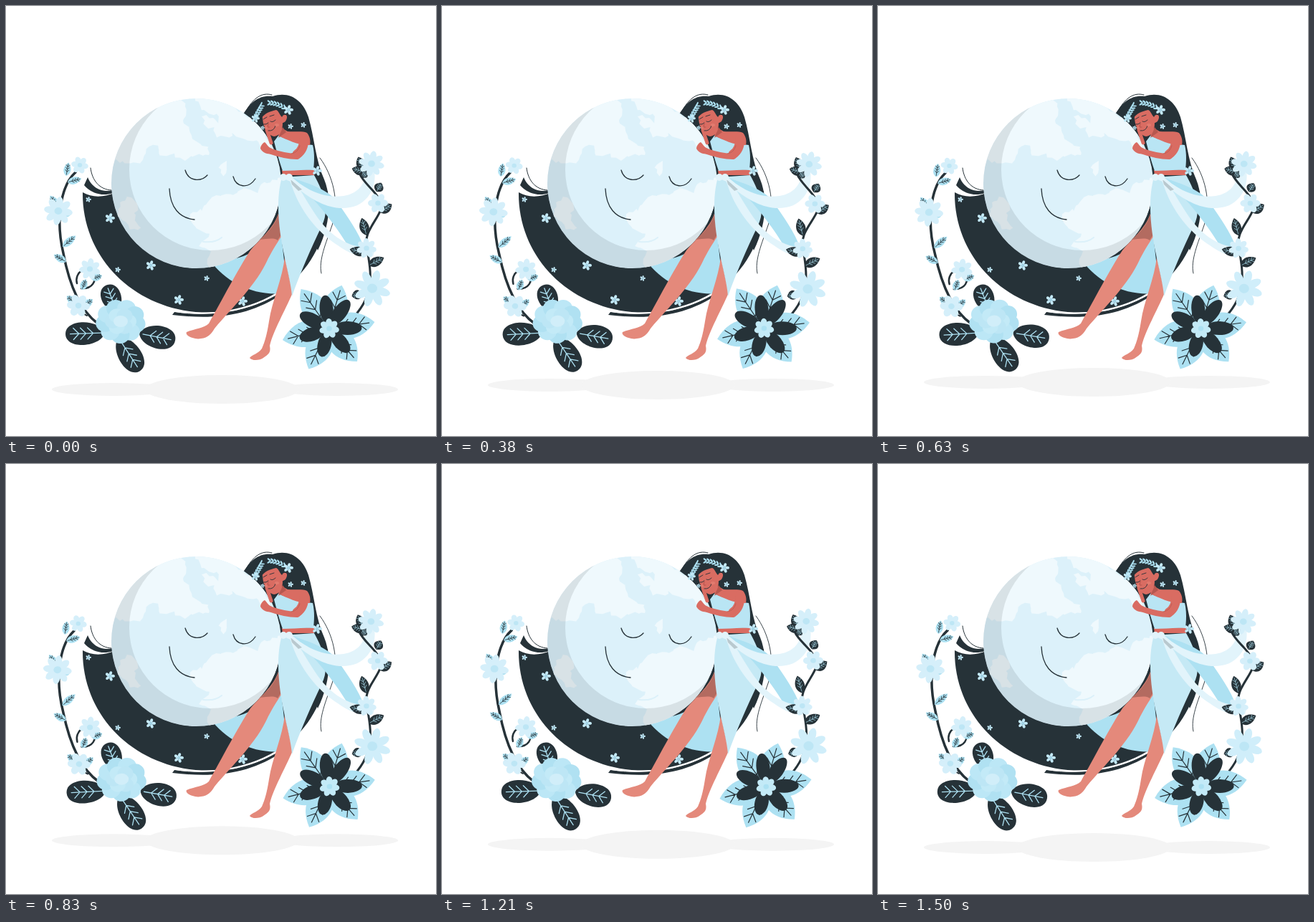
These frames come from a looping animation (600 px wide and 600 px high, 1.54 s). An HTML page:

```html
<!DOCTYPE html>
<html lang="en">
<head>
<meta charset="utf-8">
<title>Moon embrace</title>
<style>
html, body { margin: 0; width: 100%; height: 100%; overflow: hidden; background: #fff; }
svg { display: block; width: 100%; height: 100%; }
</style>
</head>
<body>
<svg id="stage" viewBox="0 0 600 600"></svg>
<script>
const INK = '#263238', SKY = '#ade1f2', MIST = '#c5e9f5', PALE = '#e2f4fb', SKIN = '#e4897b', BLUSH = '#d96c62';
const LOOP = 1540;

const fill = (d, color, extra = '') => `<path d="${d}" fill="${color}" ${extra}/>`;
const line = (d, width = 1.2, color = INK) =>
  `<path d="${d}" fill="none" stroke="${color}" stroke-width="${width}" stroke-linecap="round" stroke-linejoin="round"/>`;
const oval = (x, y, rx, ry, color, extra = '') =>
  `<ellipse cx="${x}" cy="${y}" rx="${rx}" ry="${ry}" fill="${color}" ${extra}/>`;
const place = (x, y, angle, body) => `<g transform="translate(${x} ${y}) rotate(${angle})">${body}</g>`;

function flower(x, y, r, n = 5, angle = 0, color = '#d5effa', heart = '#bde6f5', slim = 1) {
  let petals = '';
  const width = Math.min(r * .4, r * 2 / n) * slim;
  for (let i = 0; i < n; i++)
    petals += oval(r * .58, 0, r * .42, width, color, `transform="rotate(${angle + i * 360 / n})"`);
  return place(x, y, 0, petals + oval(0, 0, r * .27, r * .25, heart));
}

const star = (x, y, r, angle = 15) => flower(x, y, r, 5, angle - 90, '#c3e9f7', '#a4d8eb', .72);

// The leaf grows from (x, y) along angle.
function leaf(x, y, angle, length, width, color, vein, weight = 1, round = true) {
  const d = round
    ? `M0 0C${length * .12} ${-width * 1.25} ${length} ${-width * 1.4} ${length} 0C${length} ${width * 1.4} ${length * .12} ${width * 1.25} 0 0Z`
    : `M0 0C${length * .2} ${-width * 1.3} ${length * .65} ${-width * 1.4} ${length} 0C${length * .65} ${width * 1.4} ${length * .2} ${width * 1.3} 0 0Z`;
  let ribs = `M${length * .1} 0H${length * .88}`;
  for (const k of [.3, .48, .66])
    ribs += `M${length * (k + .14)} ${-width * .5}L${length * k} 0L${length * (k + .14)} ${width * .5}`;
  return place(x, y, angle, fill(d, color) + line(ribs, weight, vein));
}

let seed = 11;
const random = () => (seed = seed * 16807 % 2147483647) / 2147483647;

// Ragged coastline through a few points.
function coast(...p) {
  let d = '';
  for (let i = 0; i < p.length; i += 2) {
    const x = p[i], y = p[i + 1];
    const dx = p[(i + 2) % p.length] - x, dy = p[(i + 3) % p.length] - y;
    const steps = Math.max(1, Math.round(Math.hypot(dx, dy) / 5));
    for (let k = 0; k < steps; k++) {
      const nx = x + dx * k / steps + random() * 5 - 2.5, ny = y + dy * k / steps + random() * 5 - 2.5;
      d += (d ? 'L' : 'M') + nx.toFixed(1) + ' ' + ny.toFixed(1);
    }
  }
  return fill(d + 'Z', '#eff9fd');
}

function crescent() {
  return fill('M107 260C121 268 137 267 153 260L300 300L449 258C455 360 377 429 280 428C181 426 106 353 107 260Z', INK)
    + fill('M114 239C119 252 132 261 149 257V261C132 267 116 259 109 250Z', INK)
    + line('M118 226C120 243 130 256 147 257', 1)
    + fill('M235 427C283 434 337 428 383 400L380 405C334 435 284 437 232 431Z', INK)
    + line('M225 424C282 435 340 427 386 396', 2.2, '#fff')
    + [[115, 270, 4], [145, 296, 7], [202, 362, 7], [156, 368, 4], [241, 410, 7], [280, 380, 4], [330, 412, 7]]
      .map(s => star(...s)).join('');
}

function hair() {
  return fill('M331 151C341 135 352 124 372 126C397 118 415 133 422 155C430 182 432 216 444 242C455 269 452 307 435 341L400 250L382 236L370 190Z', INK)
    + line('M334 148C345 128 357 120 371 124', 1)
    + line('M438 212C456 236 466 274 455 306C446 332 436 355 440 373', .9);
}

function moon() {
  return `<clipPath id="disc"><circle cx="265.5" cy="247.5" r="118.5"/></clipPath><g clip-path="url(#disc)">`
    + oval(265.5, 247.5, 119, 119, '#dcf1fa')
    + coast(150, 215, 165, 165, 210, 130, 246, 126, 250, 145, 247, 162, 257, 175, 262, 186, 280, 195, 283, 209, 262, 208, 248, 216, 233, 207, 217, 211, 213, 194, 199, 196, 189, 219, 172, 220)
    + coast(262, 126, 300, 128, 358, 168, 372, 205, 358, 202, 352, 188, 333, 185, 318, 178, 305, 184, 294, 183, 289, 171, 276, 165, 274, 152, 298, 162, 294, 151, 276, 147)
    + coast(299, 221, 307, 217, 310, 228, 303, 236, 298, 230)
    + coast(257, 289, 274, 284, 288, 267, 317, 263, 328, 254, 349, 260, 358, 247, 386, 240, 386, 330, 320, 369, 281, 365, 284, 342, 270, 333, 284, 319, 263, 310)
    + coast(159, 275, 175, 265, 184, 279, 179, 293, 187, 310, 174, 314, 164, 298, 154, 292)
    + line('M275 329C284 330 294 329 301 323', 2, '#dcf1fa')
    + fill('M140 120H400V370H140ZM285 115A113 113 0 1 0 285 341A113 113 0 1 0 285 115Z', INK, 'fill-rule="evenodd" opacity=".115"')
    + '</g>'
    + line('M250 229C255 246 273 245 281 236M317 238C321 253 338 256 348 241M228 255C229 281 242 296 263 298', 1.3);
}

function legs() {
  return fill('M380 290C373 311 353 326 341 341C324 367 301 411 283 443C276 450 260 451 252 455C249 460 263 466 272 464C282 463 287 457 291 450C316 420 350 389 366 352C374 337 380 328 386 319Z', SKIN)
    + fill('M380 290C376 306 365 316 354 326C364 325 375 323 379 327L386 316Z', '#b36b60')
    + fill('M389 350C386 380 371 412 367 440C364 459 361 469 357 478C351 486 344 486 340 491C344 496 355 494 359 491C366 486 370 484 368 474C373 453 389 426 400 400Z', SKIN);
}

function dress() {
  return fill('M385 239L430 236C443 260 452 283 441 306C426 337 410 374 399 405C398 388 391 363 388 347C382 318 375 274 385 239Z', MIST)
    + fill('M385 229L430 228V236L386 236Z', BLUSH)
    + fill('M380 181C392 186 413 193 428 194C431 206 430 219 429 229C413 228 400 230 386 230C380 213 377 200 374 189Z', '#b9e5f4')
    + fill('M400 240C430 250 452 259 462 273C477 295 492 315 500 338L480 339C462 309 429 264 398 241Z', SKY)
    + fill('M396 242C406 278 429 312 463 334C481 347 498 352 512 349L516 337C487 340 460 327 440 302C425 283 411 256 401 242Z', PALE)
    + fill('M397 237C419 258 446 269 471 265C491 262 502 248 501 232L514 231C518 256 501 278 480 281C449 287 419 266 394 243Z', PALE)
    + fill('M397 242L413 256L408 258L399 249Z', '#b9c9cf')
    + oval(387, 239, 5, 5, PALE) + oval(395, 239, 5, 5, PALE);
}

function girl() {
  return fill('M384 170L393 175C403 176 414 174 420 177C425 183 425 190 424 194C409 195 393 187 380 181Z', BLUSH)
    + fill('M386 169L391 176L380 184Z', '#b75850')
    + line('M416 184C416 196 412 203 406 207', 13, BLUSH)
    + line('M406 210C393 210 381 207 367 202', 8, BLUSH)
    + fill('M371 199C365 197 364 192 361 190C357 192 355 196 355 199C359 206 366 207 371 206Z', BLUSH)
    + line('M410 195C408 201 405 205 398 206', .8, '#b75850')
    + line('M364 173L370 191', 5, BLUSH)
    + fill('M358 157C356 149 363 143 374 143C383 142 386 148 385 155C387 150 393 151 392 156C391 161 388 163 386 163C386 173 383 181 374 182C367 181 359 172 358 157Z', BLUSH)
    + fill('M355 159C358 144 369 139 379 139C386 141 388 148 385 155C381 151 381 147 377 145C369 147 360 149 355 159Z', INK)
    + line('M360 165Q363 166 366 163M369 161Q372 163 376 159M359 158L364 155M368 154L374 152M366 174Q374 175 376 167', .9)
    + line('M366 164L365 169L368 169', .7, '#a74944')
    + oval(378, 166, 3, 2, '#e27b6f') + oval(363, 170, 2, 2, '#e27b6f');
}

function wreath() {
  let body = '';
  for (let i = 0; i < 6; i++) {
    const x = 366 + i * 4.2, y = 135 + i * i * .24, a = i * 6;
    body += oval(x, y - 2, 3, 1.2, SKY, `transform="rotate(${a + 35} ${x} ${y})"`)
      + oval(x, y + 2, 3, 1.2, SKY, `transform="rotate(${a - 30} ${x} ${y})"`);
    const u = 349 + i * 1.8, v = 153 - i * 3.1;
    body += oval(u, v - 2, 3, 1.1, SKY, `transform="rotate(${-95 + a} ${u} ${v})"`)
      + oval(u, v + 2, 3, 1.1, SKY, `transform="rotate(${-30 + a} ${u} ${v})"`);
  }
  return body + [[394, 145, 7], [397, 168, 4], [415, 166, 4], [348, 157, 6], [358, 170, 3], [434, 230, 7]]
    .map(s => star(...s)).join('');
}

function leftVine() {
  const small = [[84, 237, -80, 19], [86, 246, -15, 20], [73, 281, -125, 20], [80, 291, -18, 12], [79, 336, -40, 24],
    [84, 357, -150, 20], [106, 396, -70, 16], [119, 381, -18, 16], [97, 415, -140, 16], [108, 420, -40, 17]];
  let body = line('M97 232C76 251 69 298 80 345C87 382 101 423 128 443', 3.5)
    + line('M99 387C95 372 112 360 121 371C128 384 120 395 105 394', 2.5)
    + line('M101 418Q103 428 113 432', 2)
    + small.map(([x, y, a, l]) => leaf(x, y, a, l, 5, SKY, INK, .75, false)).join('')
    + flower(103, 222, 12, 6, 10) + flower(73, 286, 20, 8, 8) + flower(117, 367, 15, 7, 20) + flower(101, 418, 16, 6, 5);
  body += [[138, 456, 178, 55, 16], [154, 426, -110, 39, 14], [157, 463, 57, 55, 16], [186, 457, 11, 51, 16]]
    .map(([x, y, a, l, w]) => leaf(x, y, a, l, w, INK, SKY, 1.3)).join('');
  for (let i = 0; i < 9; i++) {
    const a = i * Math.PI * 2 / 9 + .2;
    body += oval(160 + 22 * Math.cos(a), 440 + 19 * Math.sin(a), 13, 12, i % 2 ? '#bce7f6' : '#b0e1f2');
  }
  for (let i = 0; i < 6; i++) {
    const a = i * Math.PI / 3;
    body += oval(160 + 11 * Math.cos(a), 440 + 9 * Math.sin(a), 11, 10, i % 2 ? '#bde6f5' : '#c3eaf7');
  }
  return body + oval(160, 440, 10, 8, '#d1eef9');
}

function rightVine() {
  const small = [[499, 229, -112, 20], [502, 232, -165, 20], [496, 230, 50, 12], [517, 259, -60, 14], [522, 288, -35, 20],
    [503, 320, -105, 25], [504, 345, -167, 25], [506, 362, -27, 24], [497, 401, 165, 15]];
  let body = line('M494 235C500 250 528 266 523 284C517 301 497 317 504 340C510 375 514 402 486 433', 3)
    + small.map(([x, y, a, l]) => leaf(x, y, a, l, 6.5, INK, SKY, .6, false)).join('')
    + flower(510, 220, 18, 8, 12) + flower(519, 275, 14, 6, 0) + flower(503, 338, 14, 7, 10)
    + flower(511, 394, 26, 8, 18, '#d0eefa', '#bde6f5', .88);
  body += [[-125, 67], [-73, 63], [-8, 65], [49, 61], [116, 63], [166, 66]]
    .map(([a, l]) => leaf(450, 450, a, l, 18, SKY, INK, 1.2, false)).join('');
  for (const [a, l] of [[-96, 46], [-54, 48], [-1, 46], [49, 43], [104, 40], [161, 42], [207, 44]])
    body += oval(l * .58, 0, l * .43, 9.5, INK, `transform="translate(450 450) rotate(${a})"`);
  return body + flower(451, 450, 14, 7, 10, '#c3eaf7', SKY, 1.1);
}

document.getElementById('stage').innerHTML =
  `<g id="shadow">${oval(150, 535, 86, 9, '#f4f4f4')}${oval(462, 535, 85, 9, '#f4f4f4')}${oval(301, 535, 107, 20, '#f4f4f4')}</g>`
  + crescent() + hair()
  + fill('M284 354C320 359 352 346 383 310L393 400C351 407 308 388 284 354Z', SKY)
  + moon() + legs() + dress() + girl() + wreath()
  + `<g id="left">${leftVine()}</g><g id="right">${rightVine()}</g>`;

// Linear interpolation through [time, value] keys.
function track(t, keys) {
  const i = keys.findIndex(k => k[0] > t);
  const [t0, v0] = keys[i - 1], [t1, v1] = keys[i];
  return v0 + (v1 - v0) * (t - t0) / (t1 - t0);
}

const [shadow, left, right] = ['shadow', 'left', 'right'].map(id => document.getElementById(id));

function draw() {
  const t = performance.now() % LOOP;
  const lift = track(t, [[0, 0], [715, -11.4], [1500, 0], [LOOP, 0]]);
  const swayLeft = track(t, [[0, 0], [605, -1.5], [1360, .5], [LOOP, 0]]);
  const swayRight = track(t, [[0, 0], [370, 1], [1100, -1], [LOOP, 0]]);
  shadow.setAttribute('transform', `translate(0 ${lift})`);
  left.setAttribute('transform', `rotate(${swayLeft} 145 361)`);
  right.setAttribute('transform', `rotate(${swayRight} 462 355)`);
  requestAnimationFrame(draw);
}
draw();
</script>
</body>
</html>
```
